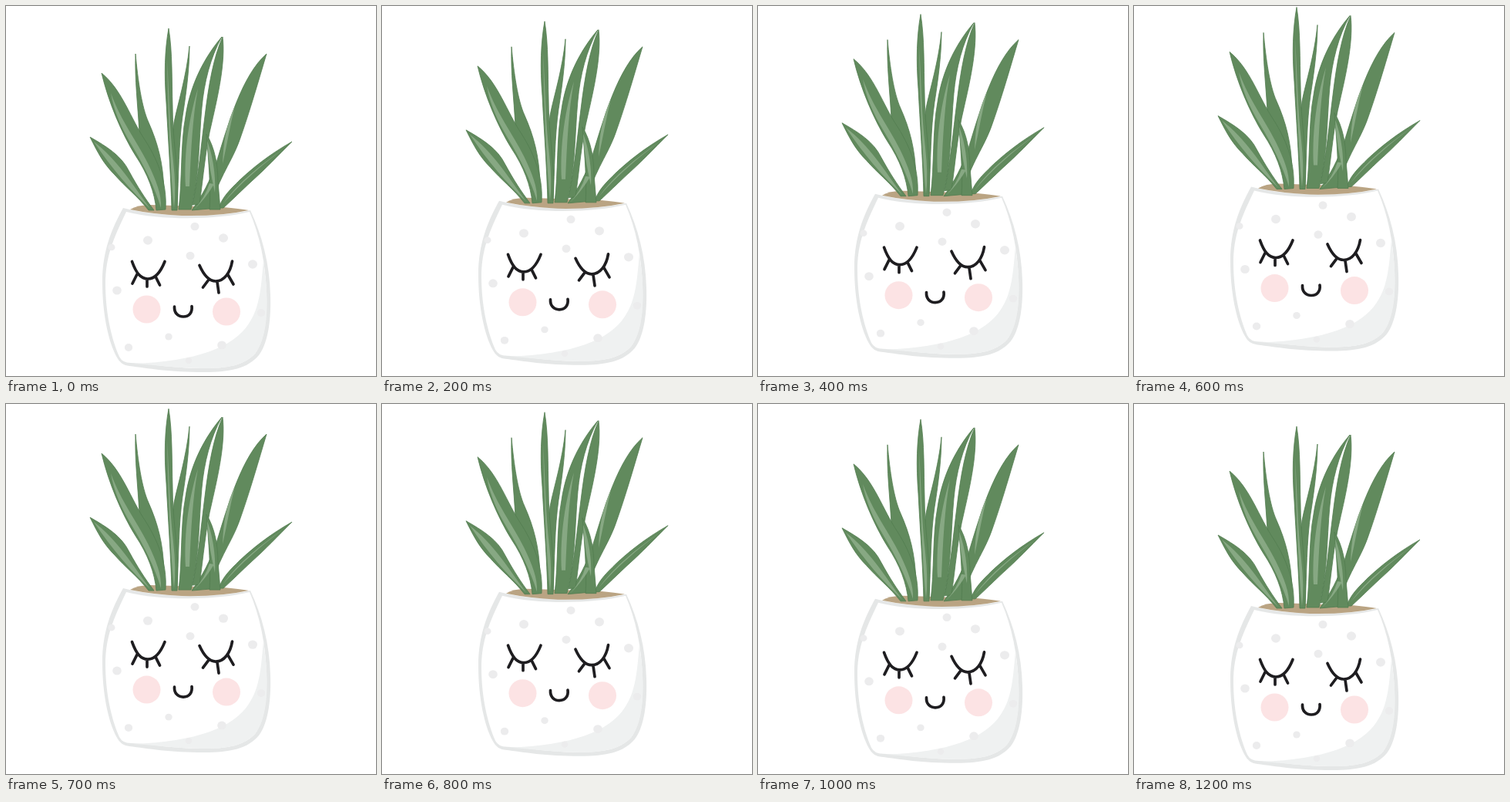
An HTML page that plays this animation: 480x480 px, repeating every 1.3 s.

```html
<!DOCTYPE html>
<html lang="en">
<head>
<meta charset="utf-8">
<title>Sleepy plant</title>
<style>
  html, body { margin: 0; width: 100%; height: 100%; overflow: hidden; background: #fff; }
  svg { display: block; width: 100vw; height: 100vh; }
  .leaf { fill: #618a5d; stroke: #527d50; stroke-width: .8; }
  .shine { fill: #87a883; }
  .ink { fill: none; stroke: #1e1d20; stroke-width: 3.7; stroke-linecap: round; }
  .dots { fill: #ececed; }
  .cheek { fill: #fce3e4; }
</style>
</head>
<body>
<svg viewBox="0 0 480 480">
  <defs>
    <path id="body" d="M152 262C137 289 125 318 125 358C125 397 132 434 144 456Q149 466 160 467C184 470 212 475 257 475C291 475 314 470 328 453C341 436 344 403 343 375C342 334 332 297 317 265C279 273 207 276 152 262Z"/>
    <clipPath id="inside"><use href="#body"/></clipPath>
  </defs>
  <g id="plant">
    <!-- pot -->
    <use href="#body" fill="#e5e7e7"/>
    <path fill="#fff" d="M156 267C139 302 129 326 129 360C129 399 137 432 147 455Q151 463 162 463C188 464 216 470 256 470C288 470 309 466 323 451C336 434 339 403 338 374C337 334 329 297 316 267C276 277 204 279 156 267Z"/>
    <path fill="#eff1f1" clip-path="url(#inside)" d="M334 330C331 362 330 390 315 412C295 443 247 461 165 464C198 466 226 470 256 470C288 470 309 466 323 451C337 434 341 398 337 357Z"/>
    <g id="dots" class="dots" clip-path="url(#inside)"></g>
    <path fill="#baa483" d="M161 264Q170 258 188 258L282 261Q303 263 315 265Q278 273 228 272Q190 270 161 264Z"/>

    <!-- leaves -->
    <g class="leaf">
      <path d="M168 62C171 96 176 131 185 151C197 178 204 204 205 240L196 238C187 210 172 185 173 164C171 128 167 96 168 62Z"/>
      <path d="M238 52C238 83 233 118 229 143C224 177 224 220 222 262L216 262C216 219 214 181 218 151C223 126 234 92 238 52Z"/>
      <path d="M338 62C329 92 316 138 303 174C293 202 278 219 264 263L241 265C255 246 265 226 273 203C288 154 306 90 338 62Z"/>
      <path d="M281 40C285 72 275 116 267 151C259 183 256 222 251 257L242 258C250 218 253 182 258 143C263 102 269 67 281 40Z"/>
      <path d="M280 40C265 67 257 99 254 132C250 176 251 223 240 264L224 264C229 225 226 180 233 143C239 102 257 67 280 40Z"/>
      <path d="M211 29C216 59 215 98 216 130C216 177 225 216 222 265L215 265C214 220 210 167 208 126C205 88 206 57 211 29Z"/>
      <path d="M124 87C151 109 162 147 181 175C200 205 209 234 207 264L195 265C193 242 184 218 168 194C150 165 133 125 124 87Z"/>
      <path d="M109 170C130 182 150 194 160 215C171 235 180 249 192 265L185 265C171 247 154 234 141 219C126 204 119 190 109 170Z"/>
      <path d="M371 176C341 193 319 211 303 226C291 238 281 247 276 262L282 262C293 252 306 239 319 227C337 211 352 195 371 176Z"/>
      <path d="M260 166C271 184 275 207 275 228L278 264L264 264C266 239 263 203 260 166Z"/>
    </g>
    <g class="shine">
      <path d="M114 176C144 199 163 230 187 263C162 239 137 211 114 176Z"/>
      <path d="M136 113C150 151 169 174 184 204C195 227 202 244 201 262C193 235 179 207 164 182C149 157 140 136 136 113Z"/>
      <path d="M209 70C212 118 212 160 217 202Q221 237 218 262C214 220 211 164 209 70Z"/>
      <path d="M249 107C242 145 240 187 238 234L233 234C231 199 235 152 249 107Z"/>
      <path d="M297 130C291 153 287 178 281 205C282 176 286 153 297 130Z"/>
      <path d="M270 231Q258 251 244 264Q258 249 264 230Z"/>
      <path d="M261 175C270 199 272 226 271 242C266 220 262 196 261 175Z"/>
      <path d="M359 186C331 207 305 229 281 257C302 228 331 206 359 186Z"/>
    </g>

    <!-- face -->
    <circle class="cheek" cx="182.5" cy="393.5" r="18"/>
    <circle class="cheek" cx="286" cy="396.5" r="18"/>
    <g class="ink">
      <path d="M163.500 331.500C169 347 175 354 184 354C194 354 201 344 206 331.500M170 348L164 360M183 355V364M194 351L199.500 362"/>
      <path d="M251 336.500C257 350 264 357 272 357C283 357 291 346 293.500 331M263 355L255.500 365M274 358L276 372M287.500 348L295 361"/>
      <path d="M218.500 390C218 398 223 403 230 403C238 403 242 397 241 389.500"/>
    </g>
  </g>
</svg>
<script>
  const plant = document.getElementById('plant');
  const spots = [[245, 286, 5.5], [282, 301, 6], [184, 304, 6], [239, 324, 5.5],
    [320, 335, 6], [144, 369, 5.8], [137, 313, 4.5], [159, 443, 5.2],
    [211, 429, 4.7], [280, 440, 5.8], [331, 398, 5.2], [237, 460, 4.3]];
  document.getElementById('dots').innerHTML = spots.map(([x, y, r]) =>
    `<ellipse cx="${x}" cy="${y}" rx="${r}" ry="${r * .95}"/>`).join('');

  // Six hops up, six hops down, one hop every 100 ms.
  function draw() {
    const step = Math.floor(performance.now() % 1300 / 100);
    const lift = (6 - Math.abs(step - 6)) * 4.58;
    plant.setAttribute('transform', `translate(0 ${-lift})`);
    requestAnimationFrame(draw);
  }
  draw();
</script>
</body>
</html>
```
